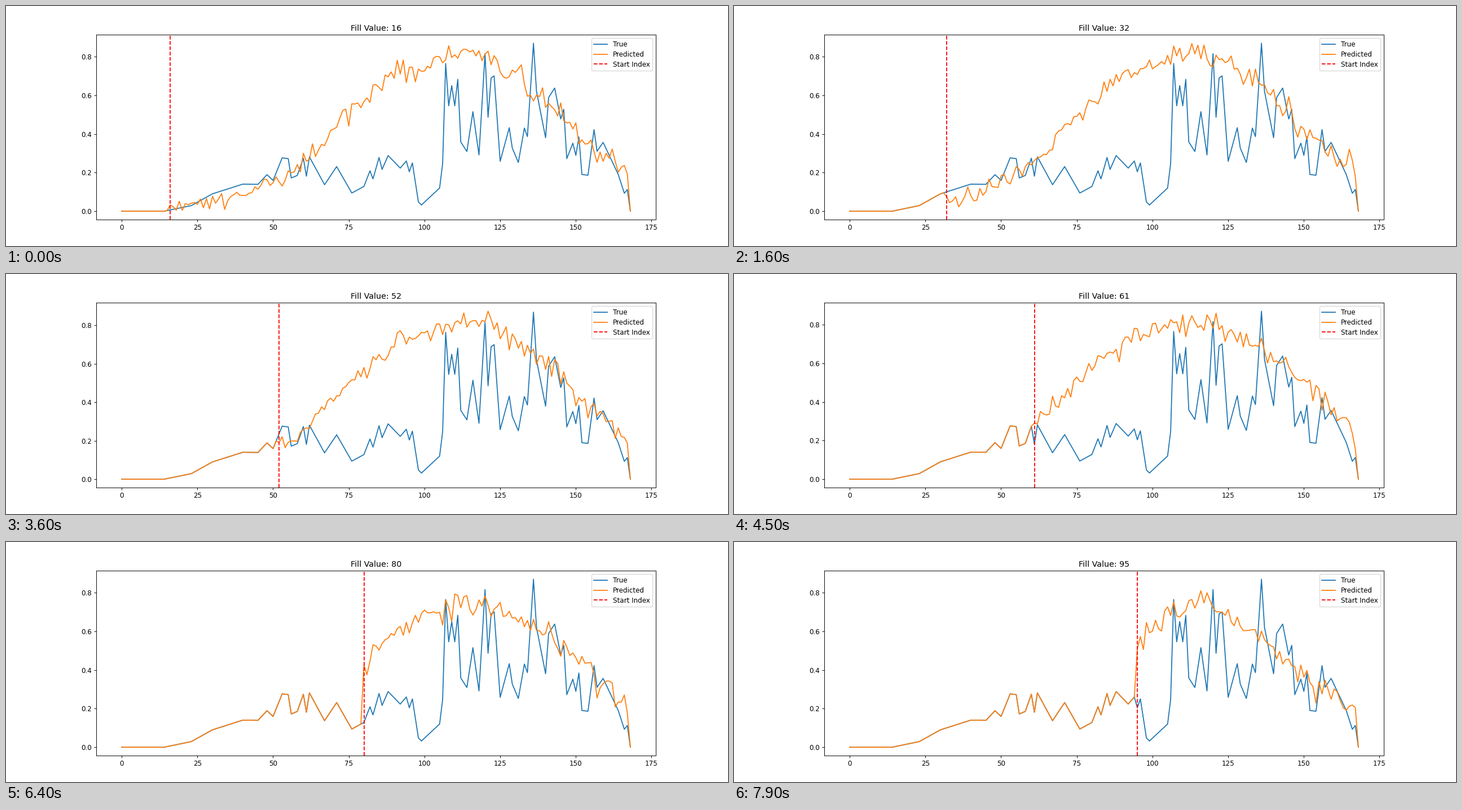
Animation, 1280 px wide and 427 px high, one loop 8 s. Source, as a matplotlib script:

```python
import matplotlib.pyplot as plt
import numpy as np
from matplotlib.animation import FuncAnimation

FRAMES, INTERVAL = 80, 100
FIRST_FILL = 16
DPI = 64
S = 4 / 3  # scales default point sizes to this dpi

plt.rcParams.update({
    "font.family": "DejaVu Sans",
    "font.size": 10 * S,
    "lines.linewidth": 1.5 * S,
    "axes.linewidth": 0.8 * S,
    "axes.titlepad": 6 * S,
    "patch.linewidth": S,
})
for axis in ("xtick", "ytick"):
    plt.rcParams.update({
        f"{axis}.major.size": 3.5 * S,
        f"{axis}.major.width": 0.8 * S,
        f"{axis}.major.pad": 3.5 * S,
    })

# Turning points of the measured series: index, value in thousandths.
CALM = [(14, 0), (23, 29), (30, 90), (40, 140), (45, 139), (48, 189), (50, 159),
        (53, 276), (55, 272), (56, 172), (58, 185), (60, 274), (61, 181),
        (62, 281), (67, 137), (71, 231), (76, 94), (80, 128), (82, 209),
        (83, 167), (85, 278), (86, 216), (88, 288), (92, 223), (94, 260),
        (95, 204), (96, 250), (98, 48), (99, 32), (105, 120), (106, 247)]
BUSY = [(107, 764), (108, 545), (109, 650), (110, 545), (111, 682), (112, 358),
        (114, 309), (116, 515), (118, 291), (120, 815), (121, 486), (122, 689),
        (123, 700), (125, 258), (128, 432), (129, 327), (131, 252), (133, 430),
        (134, 386), (136, 869), (137, 620), (140, 380), (141, 588), (143, 637),
        (145, 477), (146, 527), (147, 272), (149, 352), (150, 289), (151, 384),
        (152, 190), (154, 186), (156, 422), (157, 310), (159, 356), (164, 190),
        (166, 93), (167, 112), (168, 0)]

# Typical forecast level.
HILL = [(16, 25), (40, 70), (50, 150), (60, 240), (70, 420), (80, 580),
        (90, 700), (100, 770), (110, 810), (120, 810), (130, 710), (140, 585),
        (150, 400), (160, 280), (167, 190)]

index = np.arange(169)


def trace(points):
    x, y = zip(*points)
    return np.interp(index, x, y) / 1000


def smoothstep(a, b, x):
    t = np.clip((x - a) / (b - a), 0, 1)
    return t * t * (3 - 2 * t)


def bump(x, center, width):
    return np.exp(-((x - center) / width) ** 2)


true = trace(CALM + BUSY)
hill = trace(HILL)
spread = 0.018 + 0.014 * np.minimum(index / 100, 1)


def forecast(fill):
    """Known values up to the fill index, a noisy forecast after it."""
    late = smoothstep(61, 80, fill)
    catch_up = np.exp(-np.maximum(index - fill, 0) / 8)
    level = hill * (1 - 0.09 * late) * (1 - 0.22 * late * catch_up)
    level += 0.16 * bump(fill, 70, 15) * bump(index, 152, 14)
    noise = np.random.default_rng(fill).normal(size=len(index)) * spread
    values = np.maximum(level + noise, 0.005)
    values[:fill] = true[:fill]
    values[-1] = 0
    return values


fig, ax = plt.subplots(figsize=(1280 / DPI, 427 / DPI), dpi=DPI)
fig.subplots_adjust(left=0.125, right=0.9, bottom=0.11, top=0.88)
ax.plot(index, true, color="#1f77b4", label="True")
pred_line, = ax.plot(index, true, color="#ff7f0e", label="Predicted")
marker = ax.axvline(FIRST_FILL, color="red", linestyle="--", label="Start Index")
title = ax.set_title("")
ax.legend(loc="upper right", labelspacing=0.41)
ax.set_xlim(-8.4, 176.4)
ax.set_xticks(range(0, 176, 25))
ax.set_yticks([0, 0.2, 0.4, 0.6, 0.8])


def update(frame):
    fill = FIRST_FILL + frame
    values = forecast(fill)
    pred_line.set_ydata(values)
    marker.set_xdata([fill, fill])
    title.set_text(f"Fill Value: {fill}")
    top = max(true.max(), values.max())
    ax.set_ylim(-0.05 * top, 1.05 * top)
    return pred_line, marker, title


anim = FuncAnimation(fig, update, frames=FRAMES, interval=INTERVAL,
                     repeat=True, repeat_delay=0, blit=False)
plt.show()
```
